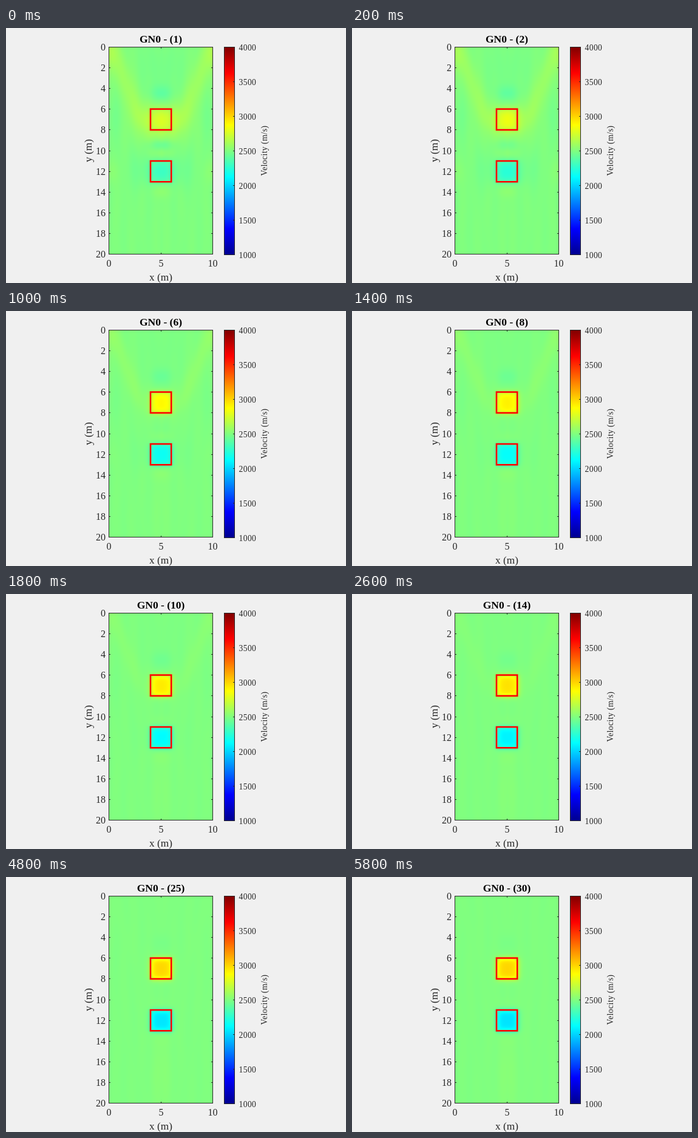
An HTML page with a canvas for the animation above (6 s loop, 560 px wide and 420 px high).

```html
<!DOCTYPE html>
<html lang="en">
<head>
<meta charset="utf-8">
<title>Velocity inversion</title>
<style>
  html, body { margin: 0; width: 100%; height: 100%; overflow: hidden; background: #f0f0f0; }
  #stage { position: relative; width: 560px; height: 420px; }
  canvas { position: absolute; left: 170px; top: 31px; width: 171px; height: 342px; }
  svg { position: absolute; left: 0; top: 0; }
  text { font-family: "Liberation Serif", "Times New Roman", serif; font-size: 16px; fill: #262626; }
  .mid { text-anchor: middle; }
  .end { text-anchor: end; }
  .label { font-size: 17.3px; }
  .small { font-size: 13.6px; letter-spacing: .4px; }
  #title { font-size: 17.5px; font-weight: bold; fill: #000; }
  .axis { fill: none; stroke: #262626; stroke-width: 1; }
  .target { fill: none; stroke: #f00; stroke-width: 2.6; }
</style>
</head>
<body>
<div id="stage">
  <canvas id="field" width="171" height="342"></canvas>
  <svg id="chart" width="560" height="420" viewBox="0 0 560 420">
    <defs>
      <linearGradient id="jet" x1="0" y1="0" x2="0" y2="1">
        <stop offset="0" stop-color="#800000"/>
        <stop offset=".125" stop-color="#f00"/>
        <stop offset=".375" stop-color="#ff0"/>
        <stop offset=".625" stop-color="#0ff"/>
        <stop offset=".875" stop-color="#00f"/>
        <stop offset="1" stop-color="#00008f"/>
      </linearGradient>
    </defs>
    <rect class="axis" x="169.5" y="31.5" width="171" height="341"/>
    <rect class="axis" x="359.5" y="31.5" width="17" height="342" style="fill:url(#jet)"/>
    <rect class="target" x="238" y="133.5" width="34.2" height="34.3"/>
    <rect class="target" x="238" y="219" width="34.2" height="34.3"/>
    <text id="title" class="mid" x="255" y="24"></text>
    <text class="mid label" x="255" y="416">x (m)</text>
    <text class="mid label" transform="translate(141 202) rotate(-90)">y (m)</text>
    <text class="mid small" transform="translate(430 202) rotate(-90)">Velocity (m/s)</text>
  </svg>
</div>
<script>
const STEP = 200, STEPS = 30;
const W = 171, H = 342, SCALE = 17.1;
const chart = document.getElementById('chart');
const title = document.getElementById('title');
const ctx = document.getElementById('field').getContext('2d');
const image = ctx.createImageData(W, H);

function add(tag, attrs, text = '') {
  const el = document.createElementNS('http://www.w3.org/2000/svg', tag);
  for (const key in attrs) el.setAttribute(key, attrs[key]);
  el.textContent = text;
  chart.append(el);
}

function drawAxes() {
  const tick = d => add('path', { class: 'axis', d });
  for (let v = 0; v <= 20; v += 2) {
    const y = Math.round(31 + v * 17.05) + 0.5;
    tick(`M170 ${y}h2M340 ${y}h-2`);
    add('text', { class: 'end', x: 164, y: y + 5.5 }, v);
  }
  for (let v = 0; v <= 10; v += 5) {
    const x = Math.round(169 + v * SCALE) + 0.5;
    tick(`M${x} 32v2M${x} 372v-2`);
    add('text', { class: 'mid', x, y: 393 }, v);
  }
  for (let v = 1000; v <= 4000; v += 500) {
    const y = Math.round(31 + (4000 - v) * 342 / 3000) + 0.5;
    tick(`M376 ${y}h-2`);
    add('text', { class: 'small', x: 383.5, y: y + 5.5 }, v);
  }
}

// Soft blobs mirrored about x = 5: offset, depth, widths, first and last strength, decay in steps
const BLOBS = [
  [0, 7.3, 2.3, 1.6, 115, 0, 2],
  [0, 4.5, 0.9, 0.7, -100, -12, 9],
  [0, 2, 1.8, 2, -28, 0, 8],
  [0, 9.4, 1, 0.4, -85, 0, 2],
  [0, 10.3, 0.9, 0.4, 35, 8, 6],
  [2, 11.8, 1, 1.5, -42, 0, 5],
  [0, 13.8, 0.8, 0.6, 50, 10, 8],
  [0, 17, 0.8, 3.5, 0, 24, 9],
  [5, 12, 0.7, 1, 40, 0, 4],
  [4.3, 7, 0.7, 1.8, -32, 0, 6],
  [4.9, 0.8, 0.5, 1.3, 50, 0, 7]
];

const bell = d => Math.exp(-d * d);
const slab = (d, soft) => (Math.tanh((d + 1) / soft) - Math.tanh((d - 1) / soft)) / 2;
const fade = (n, tau) => Math.exp(-n / tau);

function fieldAt(n) {
  const high = 505 - 225 * fade(n, 8) - 115 * fade(n, 1);
  const low = 475 - 210 * fade(n, 11) - 55 * fade(n, 1);
  const wing = 88 * fade(n, 8);
  const spread = 0.75 + 0.25 * fade(n, 3);
  const soft = 0.29 + 0.25 * fade(n, 2);
  const ripple = 6 + 4 * fade(n, 6);
  const blobs = BLOBS.map(([u, y, su, sy, a, b, tau]) =>
    [u, y, su * 1.2, sy * 1.2, b + (a - b) * fade(n, tau)]);
  return (x, y) => {
    const u = Math.abs(x - 5);
    const across = slab(x - 5, soft);
    let v = 2500 + across * (high * slab(y - 7, soft) - low * slab(y - 12, soft));
    v += wing * bell((u - 4.8 + 0.4 * y) / spread) / (1 + Math.exp((y - 7.5) * 2));
    for (const [bu, by, su, sy, a] of blobs) v += a * bell((u - bu) / su) * bell((y - by) / sy);
    return v + ripple * Math.sin(4 * u + 0.5 * Math.sin(y * 0.6)) * Math.cos(y * 0.32 + u);
  };
}

const channel = d => 255 * Math.min(1, Math.max(0, 1.5 - Math.abs(d)));

function draw(n) {
  const velocity = fieldAt(n);
  const px = image.data;
  for (let j = 0, k = 0; j < H; j++) {
    for (let i = 0; i < W; i++, k += 4) {
      const c = (velocity(i / SCALE, j / SCALE) - 1000) / 750;
      px[k] = channel(c - 3);
      px[k + 1] = channel(c - 2);
      px[k + 2] = channel(c - 1);
      px[k + 3] = 255;
    }
  }
  ctx.putImageData(image, 0, 0);
  title.textContent = `GN0 - (${n + 1})`;
}

let shown = -1;
const start = performance.now();
function frame() {
  const n = Math.floor((performance.now() - start) / STEP) % STEPS;
  if (n !== shown) draw(shown = n);
  requestAnimationFrame(frame);
}

drawAxes();
frame();
</script>
</body>
</html>
```
